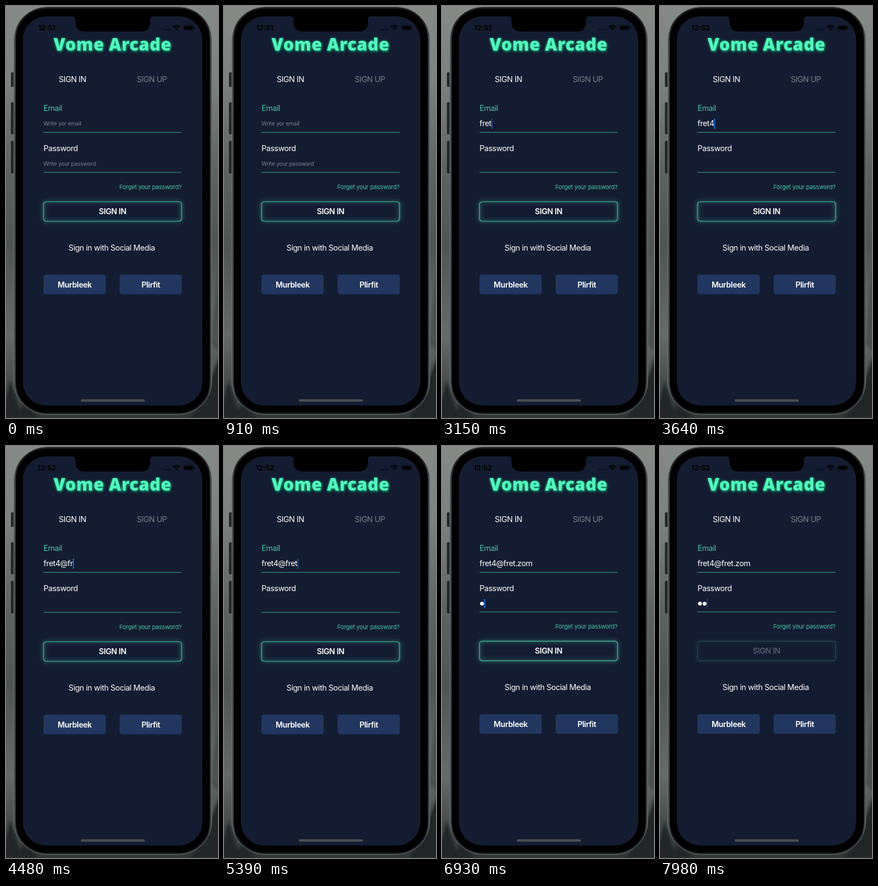
These frames come from a looping animation (390x758 px, 8000 ms). An HTML page:

```html
<!DOCTYPE html>
<html lang="en">
<head>
<meta charset="utf-8">
<title>Sign in</title>
<style>
  html, body { margin: 0; width: 100%; height: 100%; overflow: hidden; background: #151d32; }
  svg { display: block; width: 390px; height: 758px; }
  text { font: 14.4px Inter, "Open Sans", sans-serif; letter-spacing: -.03em; fill: #fff; }
  .bold { font-weight: 600; }
  .mid { text-anchor: middle; }
  .end { text-anchor: end; }
  .hint { font-size: 10.2px; letter-spacing: -.016em; fill: #7d818b; }
  .link { font-size: 11px; letter-spacing: -.02em; }
  .mint { fill: #49c2a4; }
  .off { fill: #7b7f8a; }
  .clock { font-size: 12.8px; font-weight: 700; letter-spacing: 0; fill: #000; }
  .title { font: 800 31px "Open Sans", "Noto Sans", sans-serif; letter-spacing: .02em; fill: #52f6bd;
           filter: drop-shadow(0 0 2px #159b70) drop-shadow(1px 2px 1px #0d6d55); }
  .rule { stroke: #3fa290; stroke-width: 1.1; }
  .social { fill: #22375f; }
  .cursor { fill: #1474e6; }
  .outline { fill: none; stroke: #52c7a7; stroke-width: 1.2;
             filter: drop-shadow(0 0 3px #3fa993) drop-shadow(0 0 5px #3fa99388); }
</style>
</head>
<body>
<svg viewBox="0 0 390 758">
  <defs>
    <linearGradient id="mist" x2="0" y2="1">
      <stop offset="0" stop-color="#858a87"/>
      <stop offset=".18" stop-color="#7d8280"/>
      <stop offset=".4" stop-color="#5d6361"/>
      <stop offset=".58" stop-color="#4f5553"/>
      <stop offset=".8" stop-color="#666b6a"/>
      <stop offset="1" stop-color="#303635"/>
    </linearGradient>
    <linearGradient id="metal" x2="1" y2="0">
      <stop offset="0" stop-color="#4b4e4f"/>
      <stop offset=".02" stop-color="#1d1f20"/>
      <stop offset=".98" stop-color="#1d1f20"/>
      <stop offset="1" stop-color="#4b4e4f"/>
    </linearGradient>
    <filter id="soft"><feGaussianBlur stdDeviation="2"/></filter>
  </defs>

  <rect width="390" height="758" fill="url(#mist)"/>
  <g fill="#202625" filter="url(#soft)">
    <path d="M-8 758L8 690l22 68zM20 758l14-30 26 30zM340 758l28-45 30-85v130z"/>
    <path d="M376 620l20-170v190z" opacity=".35"/>
  </g>

  <g fill="#252829">
    <rect x="9" y="122" width="6" height="27" rx="2"/>
    <rect x="9" y="177" width="6" height="59" rx="2"/>
    <rect x="9" y="248" width="6" height="60" rx="2"/>
  </g>
  <rect x="14.5" y="1.5" width="364" height="750" rx="61" fill="url(#metal)" stroke="#727777"/>
  <rect x="18" y="5" width="357" height="743" rx="57"/>
  <rect x="31" y="19" width="330" height="716" rx="43" fill="#141c31"/>
  <path d="M122 18.5q6 1 6 7v3.500q0 18 18 18h101q18 0 18-18v-3.500q0-6 6-7z"/>

  <text id="clock" class="clock mid" x="75" y="45"></text>
  <g>
    <circle cx="290" cy="43.500" r="1"/><circle cx="293.700" cy="43.500" r="1"/>
    <circle cx="297.400" cy="43.500" r="1"/><circle cx="301" cy="43.500" r="1"/>
    <path d="M307 38.500q6.500-5.500 13 0M309.300 41q4.200-3.500 8.400 0" fill="none" stroke="#000" stroke-width="1.900"/>
    <path d="M311.300 43q2.200-1.700 4.400 0l-2.200 2.300z"/>
    <rect x="326.500" y="35.500" width="18.500" height="9.500" rx="2.700" fill="none" stroke="#0a0e19"/>
    <rect x="328" y="37" width="15.500" height="6.500" rx="1.500"/>
    <path d="M346 38.500q2 1.700 0 3.500z"/>
  </g>

  <text class="title mid" x="196" y="82">Vome Arcade</text>
  <text x="97" y="140">SIGN IN</text>
  <text class="off" x="240.500" y="140">SIGN UP</text>

  <text class="mint" x="69" y="193">Email</text>
  <text id="emailHint" class="hint" x="69" y="219.500">Write yor email</text>
  <text id="email" x="69" y="221"></text>
  <path class="rule" d="M69 232.500h254"/>

  <text x="69" y="267">Password</text>
  <text id="passHint" class="hint" x="69" y="293.500">Write your password</text>
  <g fill="#fff">
    <circle class="dot" cx="73.500" cy="290" r="3.500"/>
    <circle class="dot" cx="82" cy="290" r="3.500"/>
  </g>
  <rect id="cursor" class="cursor" width="1.900" rx=".8"/>

  <g id="lower">
    <path class="rule" d="M69 306h254"/>
    <text class="link mint end" x="323" y="336.500">Forget your password?</text>
    <g id="submit">
      <rect class="outline" x="69" y="360" width="254" height="36" rx="5"/>
      <text class="bold mid" x="196" y="383">SIGN IN</text>
    </g>
    <text class="mid" x="194.500" y="450">Sign in with Social Media</text>
    <rect class="social" x="69" y="494.300" width="114.500" height="36" rx="4.500"/>
    <rect class="social" x="209" y="494.300" width="114.500" height="36" rx="4.500"/>
    <text class="bold mid" x="126.300" y="517.500">Murbleek</text>
    <text class="bold mid" x="266.300" y="517.500">Plirfit</text>
  </g>
  <rect x="137.500" y="723.500" width="118" height="4.500" rx="2.250" fill="#4b4d53"/>
</svg>

<script>
const LOOP = 8000;
const EMAIL = "fret4@fret.zom";
const KEY_TIMES = [2240, 2310, 2450, 2590, 3640, 4060, 4340, 4480, 4550, 4830, 5670, 5810, 5950, 6160];
const DOT_TIMES = [6930, 7000];
const FOCUS_EMAIL = 1120, FOCUS_PASS = 6510, PRESS = 7980, NEW_MINUTE = 3500;
const RESETS = [FOCUS_EMAIL, ...KEY_TIMES, FOCUS_PASS, ...DOT_TIMES];

const el = id => document.getElementById(id);
const dots = document.querySelectorAll(".dot");
const countPast = (times, t) => times.filter(x => x <= t).length;
const show = (node, on) => node.setAttribute("opacity", on ? 1 : 0);

// Caret stays lit after each key, then fades out and back in.
function blink(age) {
  if (age < 560) return 1;
  if (age < 630) return .6;
  if (age < 700) return .25;
  if (age < 980) return 0;
  return age < 1050 ? .4 : 1;
}

function render(t) {
  const typed = countPast(KEY_TIMES, t);
  const hidden = countPast(DOT_TIMES, t);
  const inPass = t >= FOCUS_PASS;

  el("clock").textContent = t < NEW_MINUTE ? "12:51" : "12:52";
  el("email").textContent = EMAIL.slice(0, typed);
  show(el("emailHint"), !typed);
  show(el("passHint"), !typed);
  dots.forEach((dot, i) => show(dot, i < hidden));

  const textEnd = typed ? el("email").getComputedTextLength() : 0;
  const caret = el("cursor");
  caret.setAttribute("x", inPass ? [69, 77.5, 86][hidden] : 69 + textEnd);
  caret.setAttribute("y", inPass ? 281 : 207);
  caret.setAttribute("height", inPass ? 17 : 19);
  const reset = RESETS[countPast(RESETS, t) - 1];
  caret.setAttribute("opacity", reset === undefined ? 0 : blink(t - reset));

  el("lower").setAttribute("transform", `translate(0 ${hidden ? -.8 : 0})`);
  el("submit").setAttribute("opacity", t >= PRESS ? .27 : 1);
}

const start = performance.now();
function tick() {
  render((performance.now() - start) % LOOP);
  requestAnimationFrame(tick);
}
tick();
</script>
</body>
</html>
```
